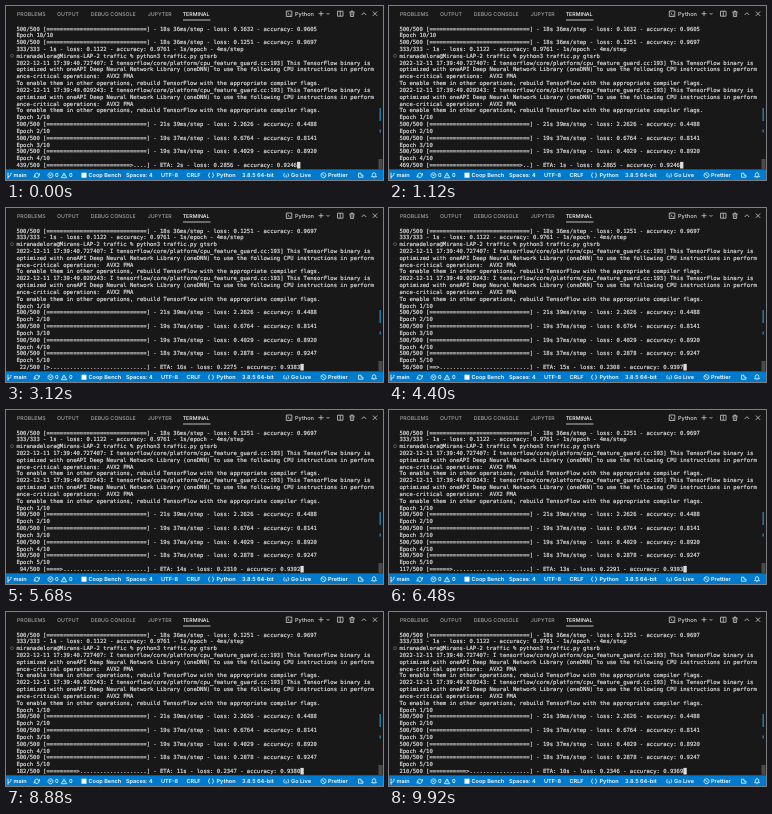
An HTML page that plays this animation: 377x174 px, repeating every 10000 ms.

```html
<!DOCTYPE html>
<html lang="en">
<head>
<meta charset="utf-8">
<title>Training log</title>
<style>
html, body { margin: 0; width: 100%; height: 100%; overflow: hidden; background: #181818; }
svg { display: block; width: 377px; height: 174px; }
text { white-space: pre; text-rendering: geometricPrecision; }
#log { font: 5.55px "DejaVu Sans Mono", monospace; fill: #dedede; }
#log text { stroke: #dedede; stroke-width: .17; }
#tabs, #status { font: 500 5.25px Inter, sans-serif; }
#tabs { fill: #a4a4a4; }
#status { font-size: 5.55px; font-weight: 600; fill: #fff; }
.icon { fill: none; stroke: #d4d4d4; stroke-width: .75; }
#status .icon { stroke: #fff; }
</style>
</head>
<body>
<svg viewBox="0 0 377 174">
  <rect width="377" height="174" fill="#181818"/>
  <g id="tabs">
    <text x="11" y="9.7">PROBLEMS</text>
    <text x="51" y="9.7">OUTPUT</text>
    <text x="84.700" y="9.7">DEBUG CONSOLE</text>
    <text x="141.700" y="9.7">JUPYTER</text>
    <text x="176.700" y="9.7" fill="#fff">TERMINAL</text>
    <path d="M177 14h27.500" stroke="#e7e7e7" stroke-width=".8"/>
    <text x="289" y="9.7" fill="#ddd" font-size="5.6">Python</text>
    <path class="icon" d="M280.300 5h5.500v5.500h-5.500zM281.600 6.500l1.300 1.200-1.300 1.200M283.500 9h1.500
      M312.500 7.700h5M315 5.200v5M320.500 7l1.500 1.500 1.500-1.500
      M331.500 5.200h5.500v5h-5.500zM334.250 5.200v5
      M343.500 6h5M345.200 6v-1h1.600v1M344.100 6l.4 4.500h3l.4-4.500M346 7v2.500
      M355.600 9l2.300-2.300 2.300 2.300M366.800 5.500l4.400 4.400M371.200 5.500l-4.400 4.400"/>
  </g>
  <g id="scrollbar">
    <path d="M374.200 102v13M374.200 123.500v3" stroke="#2a86b8" stroke-width="1.300"/>
    <rect x="372.500" y="153" width="4" height="10" fill="#4a4a4a"/>
  </g>
  <g id="log">
    <circle id="mark" class="icon" cx="6" r="1.5" style="stroke:#666"/>
    <rect id="cursor" y="155.900" width="3.340" height="6.600" fill="#dedede"/>
  </g>
  <g id="status">
    <rect y="163.300" width="377" height="10.700" fill="#007acc"/>
    <text x="7.500" y="171.200">main</text>
    <text x="49" y="171.200">0</text>
    <text x="63" y="171.200">0</text>
    <text x="82.500" y="171.200">Coop Bench</text>
    <text x="120" y="171.200">Spaces: 4</text>
    <text x="155" y="171.200">UTF-8</text>
    <text x="180.500" y="171.200">CRLF</text>
    <text x="210.500" y="171.200">Python</text>
    <text x="236" y="171.200">3.8.5 64-bit</text>
    <text x="285" y="171.200">Go Live</text>
    <text x="322" y="171.200">Prettier</text>
    <rect x="75.500" y="166.700" width="5" height="5"/>
    <path class="icon" transform="translate(0 .7)" d="M2 167v4M5 167.500q0 2-3 2.500M1.300 166.500h1.400M4.300 166.800h1.400M1.300 171.300h1.400
      M28.500 168.600a2.400 2.400 0 0 1 4.600-.7M33.100 168.600a2.400 2.400 0 0 1-4.600.7M33.500 166.500v1.700h-1.700M28.100 170.800v-1.700h1.700
      M44.500 166.100a2.500 2.500 0 1 0 .01 0M43.500 167.600l2 2M45.500 167.600l-2 2
      M58 166.200l2.700 4.800h-5.400zM58 168v1.500
      M204 166.200q-1 0-1 1t-1 1.300q1 .3 1 1.300t1 1M206 166.200q1 0 1 1t1 1.300q-1 .3-1 1.300t-1 1
      M278.400 166.500q-1.500 2 0 4M281.900 166.500q1.500 2 0 4M280.150 168v3
      M317.500 166a2.500 2.500 0 1 0 .01 0M315.800 166.800l3.400 3.400
      M352.500 166.500h2.500v2h2v2h-4.500zM365.500 170h5l-.8-1v-1.500q-.3-1.500-1.700-1.500t-1.700 1.500v1.500zM367.500 171h1"/>
  </g>
</svg>
<script>
const LOOP = 10000, STEP = 80, NEXT_EPOCH = 2320;
const LEFT = 10.4, TOP = 24.5, PITCH = 6.83, CHAR = 3.341, ROWS = 21;

const done = (secs, ms, loss, acc) =>
  `500/500 [${"=".repeat(30)}] - ${secs}s ${ms}ms/step - loss: ${loss} - accuracy: ${acc}`;

const notice = time => [
  `2022-12-11 ${time}: I tensorflow/core/platform/cpu_feature_guard.cc:193] This TensorFlow binary is`,
  "optimized with oneAPI Deep Neural Network Library (oneDNN) to use the following CPU instructions in perform",
  "ance-critical operations:  AVX2 FMA",
  "To enable them in other operations, rebuild TensorFlow with the appropriate compiler flags."
];

const PROMPT = "miranadelora@Mirans-LAP-2 traffic % python3 traffic.py gtsrb";
const history = [
  done(18, 36, "0.1632", "0.9605"),
  "Epoch 10/10",
  done(18, 36, "0.1251", "0.9697"),
  "333/333 - 1s - loss: 0.1122 - accuracy: 0.9761 - 1s/epoch - 4ms/step",
  PROMPT,
  ...notice("17:39:40.727407"),
  ...notice("17:39:49.029243"),
  "Epoch 1/10",
  done(21, 39, "2.2626", "0.4488"),
  "Epoch 2/10",
  done(19, 37, "0.6764", "0.8141"),
  "Epoch 3/10",
  done(19, 37, "0.4029", "0.8920"),
  "Epoch 4/10"
];
const nextHistory = [...history, done(18, 37, "0.2878", "0.9247"), "Epoch 5/10"];

// time, batch, loss, accuracy
const keys = [
  [0, 439, .2856, .9246], [2240, 499, .2875, .9247],
  [NEXT_EPOCH, 1, .2254, .9375], [4400, 56, .2308, .9397],
  [5680, 94, .2310, .9392], [7280, 139, .2272, .9393],
  [8880, 182, .2347, .9380], [9920, 210, .2346, .9369]
];

function progress(t) {
  const i = Math.max(1, keys.findIndex(k => k[0] >= t));
  const [a, b] = [keys[i - 1], keys[i]];
  const f = (t - a[0]) / (b[0] - a[0]);
  const [, batch, loss, acc] = a.map((v, j) => v + (b[j] - v) * f);
  const n = Math.round(batch), width = Math.floor(n * 30 / 500);
  const bar = (width ? "=".repeat(width - 1) + ">" : "").padEnd(30, ".");
  const eta = Math.floor((500 - n) * .0355);
  return `${String(n).padStart(3)}/500 [${bar}] - ETA: ${eta}s - loss: ${loss.toFixed(4)} - accuracy: ${acc.toFixed(4)}`;
}

const log = document.getElementById("log");
const mark = document.getElementById("mark");
const cursor = document.getElementById("cursor");
const rows = Array.from({ length: ROWS }, (_, i) => {
  const row = document.createElementNS("http://www.w3.org/2000/svg", "text");
  row.setAttribute("x", LEFT);
  row.setAttribute("y", TOP + i * PITCH);
  return log.appendChild(row);
});

function draw() {
  const t = Math.floor(performance.now() % LOOP / STEP) * STEP;
  const past = t < NEXT_EPOCH ? history : nextHistory;
  const lines = [...past, progress(t)].slice(-ROWS);
  rows.forEach((row, i) => {
    if (row.textContent !== lines[i]) row.textContent = lines[i];
  });
  mark.setAttribute("cy", TOP - 2 + lines.indexOf(PROMPT) * PITCH);
  cursor.setAttribute("x", LEFT + lines[ROWS - 1].length * CHAR);
  requestAnimationFrame(draw);
}
draw();
</script>
</body>
</html>
```
